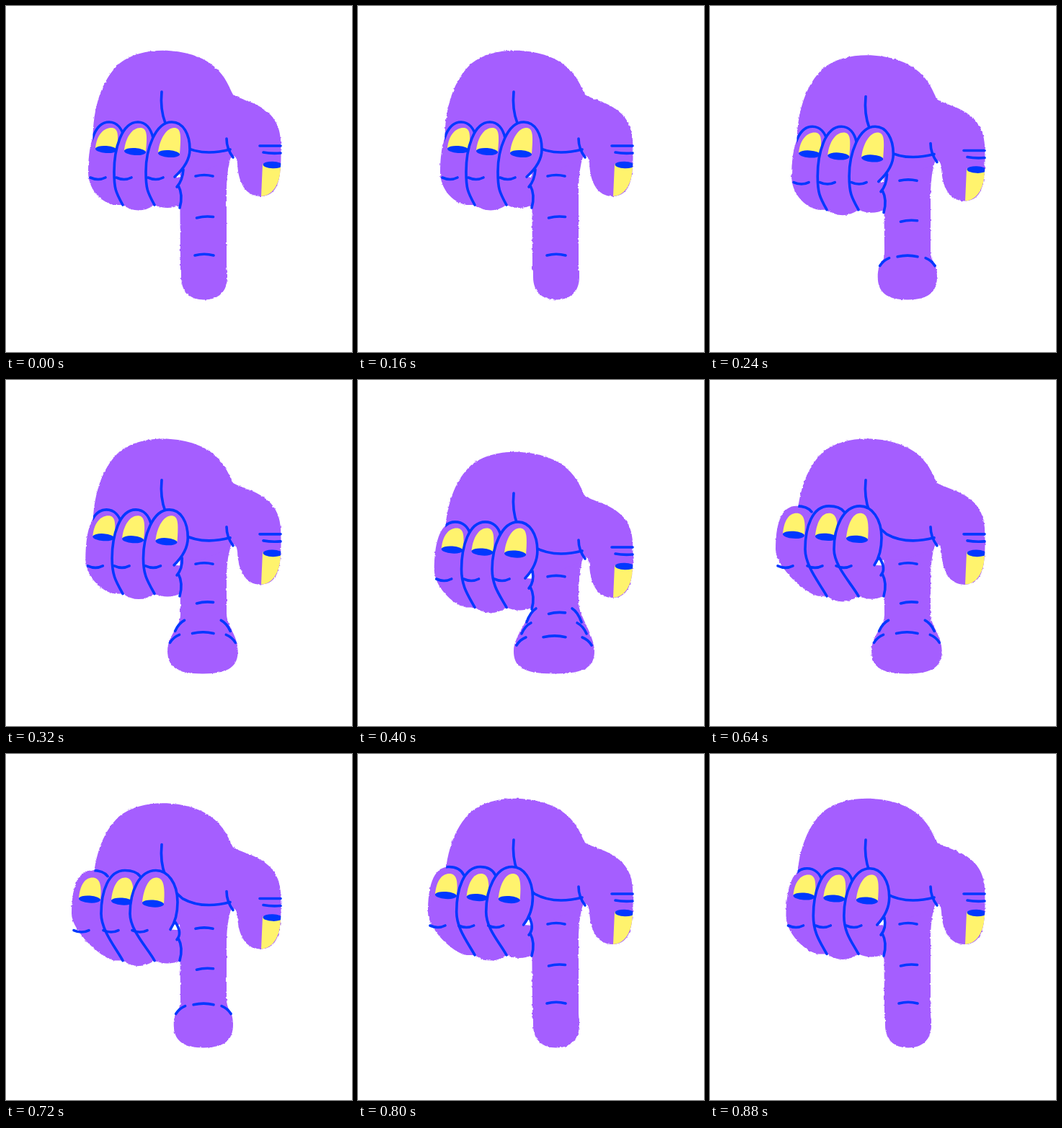
An HTML page for the animation above (960 ms loop, 480 by 480 pixels).

```html
<!DOCTYPE html>
<html lang="en">
<head>
<meta charset="utf-8">
<title>Pressing finger</title>
<style>
  html, body { margin: 0; width: 100%; height: 100%; overflow: hidden; background: #fff; }
  svg { display: block; width: 100vw; height: 100vh; }
  .skin { fill: #a55eff; }
  .nail { fill: #fff36d; }
  .lens { fill: #0038ff; }
  .line { fill: none; stroke: #0038ff; stroke-width: 3.6; stroke-linecap: round; stroke-linejoin: round; }
</style>
</head>
<body>
<svg id="stage" viewBox="0 0 480 480"></svg>
<script>
const STEP = 80, COUNT = 12, DEPTH = 38;

const HAND = 'M121 200C118 150 130 105 157 80C190 52 262 58 290 85C305 98 309 112 315 123' +
  'C330 133 378 137 381 185C383 235 380 262 355 264C333 265 322 246 321 218' +
  'C320 206 313 205 310 214L270 230H180Z';
const PALM = 'M216 119C213 150 222 176 245 194Q272 209 311 199';
const THUMB = 'M306 184Q306 198 315 210M352 194H381M357 203Q368 205 381 204';
const THUMB_NAIL = 'M356 219L354 264C367 264 381 250 382 219Z';

// Folded fingers: foot, left side and tip in x, travel when curled, heel handle
const FINGERS = [
  { foot: 150, left: 114, tip: 143, slide: 23, heel: [20, 4] },
  { foot: 162, left: 150, tip: 183, slide: 18, heel: [10, 18] },
  { foot: 206, left: 194, tip: 230, slide: 22, heel: [10, 18] }
];

const path = (cls, d, extra = '') => `<path class="${cls}" d="${d}" ${extra}/>`;
const line = (d, extra) => path('line', d, extra);
const lens = (x, y, rx, ry, tilt) =>
  `<ellipse class="lens" rx="${rx}" ry="${ry}" transform="translate(${x} ${y}) rotate(${tilt})"/>`;

function nail(x, y, h, lean) {
  return path('nail', `M${x - 15} ${y - 2}C${x - 13} ${y - 21} ${x + lean - 10} ${y - h} ${x + lean} ${y - h}
    C${x + lean + 10} ${y - h} ${x + 17} ${y - h + 10} ${x + 15} ${y}Z`) + lens(x, y, 15, 5, 4);
}

function finger({ foot, left, tip, slide, heel }, i, curl, rough) {
  const x = left - slide * curl, y = 230 - 15 * curl;
  const tx = tip - slide * curl, ty = 161 - 6 * curl;
  const bottom = 276 + 4 * curl, last = i === 2;
  const side = 255 - 17 * curl;

  const outer = `M${foot} ${bottom}C${foot - heel[0]} ${bottom - heel[1]} ${x} ${y + 23} ${x} ${y}
    C${x} ${y - 31} ${tx - 23} ${ty} ${tx} ${ty}`;
  const inner = last
    ? `C${tx + 16} ${ty} ${side} ${ty + 17} ${side} 199C${side} 215 ${244 - 10 * curl} 228 ${234 - 6 * curl} 237`
    : `C${tx + 11} ${ty} ${tx + 18} ${ty + 9 - 5 * curl} ${tx + 21} ${ty + 22 - 14 * curl}`;
  const next = last ? 242 : FINGERS[i + 1].foot;
  const base = `${last ? 'L245 238' : ''}L${next} ${bottom}Q${(foot + next) / 2} ${bottom + 8 * i * (last ? .5 : 1.9)} ${foot} ${bottom}Z`;

  const folds = `M${x + 3} 238q11 5 21 0` +
    (last ? `M${246 - 11 * curl} 227Q245 242 237 251M239 249Q246 262 241 280` : '');
  return path('skin', outer + inner + base, rough) +
    nail(tx - 4, ty + 38 + 3 * i + 2 * curl, 30 + 3 * i, 7 - 3 * curl) +
    line(outer + inner, i ? '' : 'clip-path="url(#hand)"') + line(folds);
}

// Pointing finger: the tip stays on the ground and widens as the hand drops
function pointer(drop, squash) {
  const cx = 275 - 3 * squash, w = 32 + 24 * squash;
  const neck = 360 - 50 * squash, flat = 20 + 26 * squash;
  const shape = `M290 ${200 + drop}L312 ${209 + drop}Q307 ${225 + drop} 306 ${250 + drop}L306 ${neck}
    C307 ${neck + 18} ${cx + w} ${354} ${cx + w} 376
    C${cx + w} 396 ${cx + flat} 407.5 ${cx} 407.5S${cx - w} 396 ${cx - w} 376
    C${cx - w} 354 242 ${neck + 18} 242 ${neck}L241 ${215 + drop}Z`;

  let creases = `M263 ${236 + drop * .97}q12 -3 24 0M264.5 ${294 + drop * .8}q11 -3 23 -1.5
    M${262 - 5 * squash} ${346 + drop * .28}q${13 + 3 * squash} -3.5 ${26 + 5 * squash} 0`;
  for (let j = 0; j < Math.round(squash * 3); j++) {
    const y = 356 + 12 * squash - 16 * j, r = .93 * w - 7 * j;
    for (const s of [-1, 1])
      creases += `M${cx + s * r} ${y}q${-s * 5} ${-8 - 3 * j} ${-s * 13} ${-11 - 4 * j}`;
  }
  return { shape, creases };
}

function pose(i) {
  // The press is symmetric in time; the fingers curl slowly and open quickly
  const press = Math.min(1, Math.max(0, (4 - Math.abs(i - 6)) / 3)) ** 1.6;
  const curl = Math.min(1, Math.max(0, (i - 2) / 5) ** 2, (COUNT - i) / 2.7);
  const drop = DEPTH * press;
  const { shape, creases } = pointer(drop, press ** .55);
  const rough = `filter="url(#rough${i})"`;

  return `<filter id="rough${i}" color-interpolation-filters="sRGB">
      <feTurbulence type="fractalNoise" baseFrequency=".25" numOctaves="2" seed="${i + 3}"/>
      <feDisplacementMap in="SourceGraphic" scale="2.8" xChannelSelector="R" yChannelSelector="G"/>
    </filter>
    <g class="pose" display="none">
      ${path('skin', shape, rough)}
      <g transform="translate(0 ${drop})">
        ${path('skin', HAND, rough)}
        <g clip-path="url(#hand)">${path('nail', THUMB_NAIL)}${lens(370, 220.5, 13.5, 4.8, 2)}</g>
        ${line(PALM)}${line(THUMB)}
        ${FINGERS.map((f, n) => finger(f, n, curl, rough)).join('')}
      </g>
      ${line(creases)}
    </g>`;
}

const stage = document.getElementById('stage');
stage.innerHTML = `<clipPath id="hand"><path d="${HAND}"/></clipPath>` +
  Array.from({ length: COUNT }, (_, i) => pose(i)).join('');
const poses = stage.querySelectorAll('.pose');
let shown = -1;

function tick() {
  const now = Math.floor((performance.now() + .5) / STEP) % COUNT;
  if (now !== shown) {
    poses.forEach((g, i) => g.setAttribute('display', i === now ? 'inline' : 'none'));
    shown = now;
  }
  requestAnimationFrame(tick);
}
tick();
</script>
</body>
</html>
```
